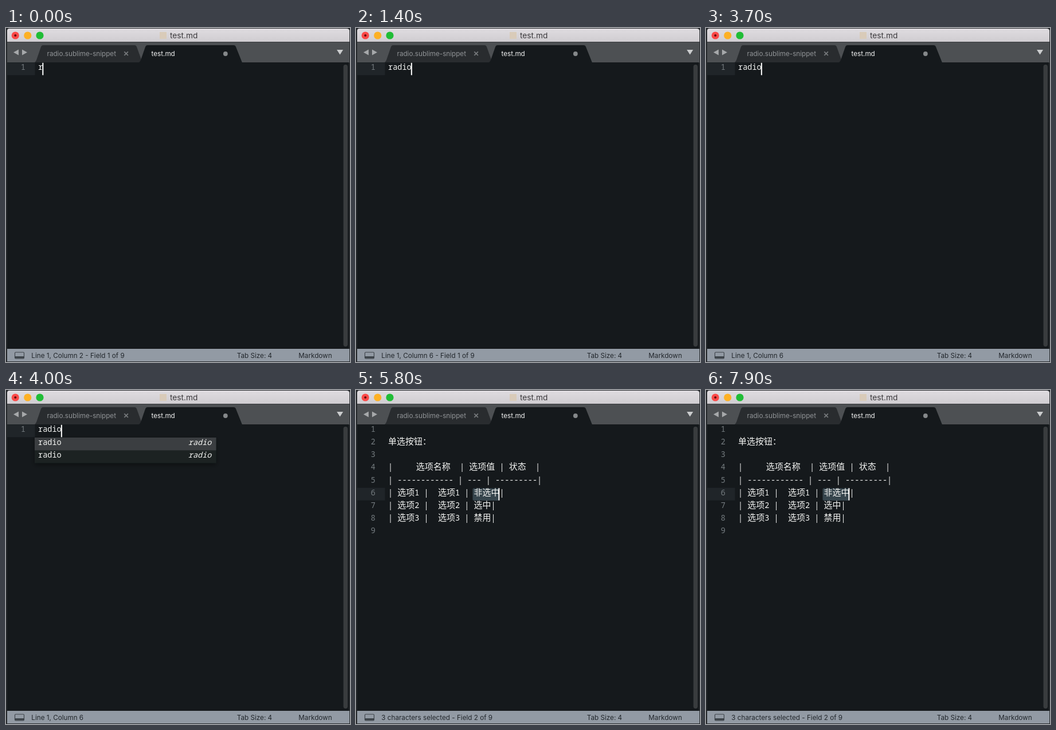
These frames come from a looping animation (600x583 px, 8000 ms). An HTML page:

```html
<!DOCTYPE html>
<html lang="zh-CN">
<head>
<meta charset="utf-8">
<title>Snippet editor</title>
<style>
  html, body { margin: 0; width: 100%; height: 100%; overflow: hidden; background: #202326; }
  svg { display: block; width: 100vw; height: 100vh; }
  text { white-space: pre; }
  .ui { font: 11.7px Inter, sans-serif; }
  .code { font: 500 13.55px "Noto Sans Mono", monospace; fill: #f4f5f3; }
  .cjk { font: 500 15px "Noto Sans CJK SC", "Noto Sans CJK", sans-serif; }
  .num { font-weight: 400; fill: #747b7f; text-anchor: end; }
</style>
</head>
<body>
<svg viewBox="0 0 600 583">
  <defs>
    <linearGradient id="title" x2="0" y2="1">
      <stop stop-color="#dfdce0"/><stop offset="1" stop-color="#cfccd0"/>
    </linearGradient>
    <filter id="shadow" x="-10%" y="-30%" width="120%" height="180%">
      <feDropShadow dx="0" dy="3" stdDeviation="4" flood-opacity=".4"/>
    </filter>
  </defs>

  <rect width="600" height="583" fill="#25282b"/>
  <path d="M2 25V5Q2 1 6 1H594Q599 1 599 5V25Z" fill="url(#title)"/>
  <circle cx="16.3" cy="13" r="6.6" fill="#fc4a48"/>
  <circle cx="16.3" cy="13" r="2.1" fill="#650b0b"/>
  <circle cx="37.8" cy="13" r="6.6" fill="#fdb124"/>
  <circle cx="59" cy="13" r="6.6" fill="#20bd36"/>
  <rect x="268" y="7" width="12" height="12" fill="#d9cbb9"/>
  <text class="ui" x="286" y="18" style="font-size:13.7px" fill="#3b393c">test.md</text>

  <rect x="2" y="24.5" width="597" height="36" fill="#4d5053"/>
  <path d="M2 24.5H599" stroke="#3b3d40"/>
  <path d="M22 37.5V47.5L13 42.5ZM28 37.5V47.5L37 42.5Z" fill="#a6a8aa"/>
  <path d="M577 38H588L582.5 46.5Z" fill="#cbcdce"/>
  <path d="M49 60.5Q52 59 53 56L61 33Q62 30 65 30H224Q227 30 228 33L238 60.5Z" fill="#292c2f"/>
  <path d="M231 60.5Q234 59 235 56L243 33Q244 30 247 30H397Q400 30 401 33L412 60.5Z" fill="#15191c"/>
  <text class="ui" x="71.5" y="48.5" fill="#919497">radio.sublime-snippet</text>
  <path d="M206.3 41.3l6.6 6.6m0-6.6l-6.6 6.6" stroke="#74777a" stroke-width="1.9"/>
  <text class="ui" x="253.5" y="48.5" fill="#f1f2f2" font-weight="500">test.md</text>
  <circle cx="382.8" cy="45" r="3.9" fill="#85888a"/>

  <rect x="2" y="60" width="596" height="500" fill="#15191c"/>
  <rect x="588.5" y="64" width="7.5" height="492" rx="3.7" fill="#393c3e"/>
  <rect id="mark" x="2" width="48.5" height="22" fill="#202529"/>
  <rect id="pick" x="203.5" y="171.5" width="46" height="21.5" rx="2" fill="#36454d"/>
  <g id="lines"></g>

  <g id="popup">
    <rect x="50" y="83" width="316.5" height="44.5" fill="#1c2021" filter="url(#shadow)"/>
    <rect x="50" y="83" width="316.5" height="22.3" fill="#3b3e41"/>
    <g class="code">
      <text x="56" y="96">radio</text>
      <text x="358.5" y="96" text-anchor="end" font-style="italic">radio</text>
      <text x="56" y="118.4">radio</text>
      <text x="358.5" y="118.4" text-anchor="end" font-style="italic">radio</text>
    </g>
  </g>
  <rect id="caret" width="2" height="21.5" fill="#fff"/>

  <rect x="2" y="560" width="597" height="22" fill="#929aa4"/>
  <rect x="15.5" y="566" width="16" height="11" rx="1.5" fill="none" stroke="#3c4248" stroke-width="1.1"/>
  <path d="M16 574.8H31" stroke="#3c4248" stroke-width="3.4"/>
  <g class="ui" fill="#22272c">
    <text id="status" x="44.3" y="575.7"></text>
    <text x="402.8" y="575.7">Tab Size: 4</text>
    <text x="510.3" y="575.7">Markdown</text>
  </g>
</svg>

<script>
const LOOP = 8000, ROW = 22.08, CELL = 8.13, LEFT = 56;
const POPUP = 4000, INSERT = 5600, EXIT = 3700;
const keys = [0, 200, 400, 650, 910];
const tabs = [1700, 2000, 2300, 2600, 2900, 3100, 3400];
const snippet = [
  "",
  "单选按钮：",
  "",
  "|     选项名称  | 选项值 | 状态  |",
  "| ------------ | --- | ---------|",
  "| 选项1 |  选项1 | 非选中|",
  "| 选项2 |  选项2 | 选中|",
  "| 选项3 |  选项3 | 禁用|",
  ""
];
const resets = [...keys, ...tabs, EXIT, POPUP, INSERT];

const $ = id => document.getElementById(id);
const set = (id, attrs) => {
  for (const k in attrs) $(id).setAttribute(k, attrs[k]);
};
const show = (id, on) => set(id, { visibility: on ? "visible" : "hidden" });
const passed = (times, t) => times.filter(x => x <= t).length;

const wide = s => s.replace(/[\u3000-\u9fff\uff00-\uffef]+/g, '<tspan class="cjk">$&</tspan>');

const drawLines = lines => lines.map((s, i) => {
  const y = 73.2 + i * ROW;
  return `<text class="code num" x="34" y="${y}">${i + 1}</text>` +
    `<text class="code" x="${LEFT}" y="${y}">${wide(s)}</text>`;
}).join("");

let shown;
function setLines(lines) {
  const key = lines.join("\n");
  if (key === shown) return;
  shown = key;
  $("lines").innerHTML = drawLines(lines);
}

function statusText(t, typed) {
  if (t >= INSERT) return "3 characters selected - Field 2 of 9";
  const place = `Line 1, Column ${typed + 1}`;
  return t >= EXIT ? place : `${place} - Field ${passed(tabs, t) + 1} of 9`;
}

function render(t) {
  const inserted = t >= INSERT;
  const typed = passed(keys, t);
  const row = inserted ? 5 : 0;

  setLines(inserted ? snippet : ["radio".slice(0, typed)]);
  set("mark", { y: 60.3 + row * ROW });
  set("caret", {
    x: inserted ? 248.4 : LEFT + typed * CELL - 0.8,
    y: 60.8 + row * ROW
  });

  // Every keystroke restarts the blink.
  const last = resets[passed(resets, t) - 1];
  show("caret", (t - last) % 1000 < 500);
  show("pick", inserted);
  show("popup", t >= POPUP && !inserted);

  const label = statusText(t, typed);
  if ($("status").textContent !== label) $("status").textContent = label;
}

const start = performance.now();
function tick() {
  render((performance.now() - start) % LOOP);
  requestAnimationFrame(tick);
}
tick();
</script>
</body>
</html>
```
